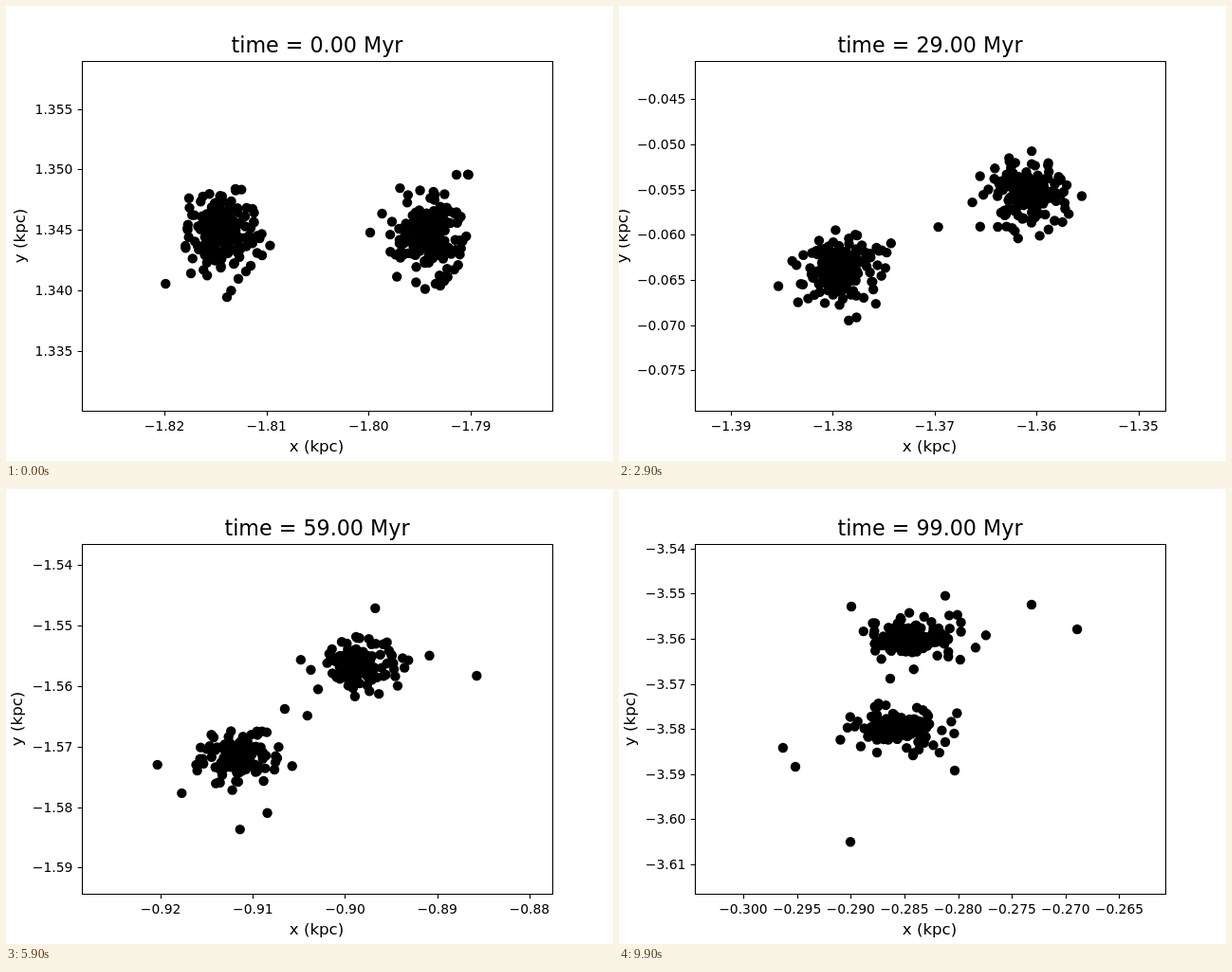
An HTML page for the animation above (10000 ms loop, 640 by 480 pixels).

```html
<!DOCTYPE html>
<html lang="en">
<head>
<meta charset="utf-8">
<title>Binary cluster</title>
<style>
  html, body { margin: 0; width: 100%; height: 100%; overflow: hidden; background: #fff; }
  svg { display: block; width: 640px; height: 480px; font-family: "DejaVu Sans", sans-serif; }
  text { text-anchor: middle; font-size: 13.89px; }
  .label { font-size: 16.67px; }
  #title { font-size: 22.22px; }
  #yTicks text { text-anchor: end; }
  path { fill: none; stroke: #000; stroke-width: 1.11; }
</style>
</head>
<body>
<svg viewBox="0 0 640 480">
  <g id="dots"></g>
  <path d="M80.5 58.5H576.5V427.5H80.5Z"/>
  <path id="marks"/>
  <g id="xTicks"></g>
  <g id="yTicks"></g>
  <text id="title" x="328" y="49"></text>
  <text class="label" x="327.5" y="470">x (kpc)</text>
  <text class="label" id="yLabel">y (kpc)</text>
</svg>
<script>
// Lengths are in parsecs, times in steps of 1 Myr
const PLOT = { x: 328, y: 242.4, width: 496, height: 369.6 };
const FRAME_MS = 100, FRAMES = 100, LAST = FRAMES - 2;
const CORE = 1.9, EDGE = 4.2, DOT = 5.2;
const $ = id => document.getElementById(id);

// View key points: step, offset from the pair's centre, visible width and height
const VIEW = [
  [0, -0.81, -0.17, 46.06, 28.94],
  [8, 0.18, -1.13, 45.82, 31.09],
  [28, -0.26, -0.61, 46.19, 38.77],
  [41, 0.98, 0.11, 50.32, 46.71],
  [58, 2.09, -1.38, 51.04, 57.93],
  [84, 2.01, -6.2, 48.75, 70.4],
  [98, 2.44, -7.72, 43.78, 77.65]
];

function viewAt(n) {
  const i = Math.max(1, VIEW.findIndex(key => key[0] >= n));
  const a = VIEW[i - 1], b = VIEW[i], u = (n - a[0]) / (b[0] - a[0]);
  const [, dx, dy, width, height] = a.map((v, k) => v + (b[k] - v) * u);
  const mx = -1804.24 + 15.502 * n, my = 1344.69 - 50.15 * n;
  const cx = mx + dx, cy = my + dy;
  const sx = PLOT.width / width, sy = PLOT.height / height;
  return {
    mx, my, cx, cy, width, height, sx, sy,
    toX: x => PLOT.x + (x - cx) * sx,
    toY: y => PLOT.y - (y - cy) * sy
  };
}

let seed = 20417;
function rand() {
  seed = (seed + 0x6D2B79F5) | 0;
  let t = Math.imul(seed ^ (seed >>> 15), 1 | seed);
  t = (t + Math.imul(t ^ (t >>> 7), 61 | t)) ^ t;
  return ((t ^ (t >>> 14)) >>> 0) / 4294967296;
}

// Random direction on a sphere, seen from the front
function direction() {
  const z = 2 * rand() - 1, a = 2 * Math.PI * rand(), s = Math.sqrt(1 - z * z);
  return [s * Math.cos(a), s * Math.sin(a)];
}

// Bound star on an ellipse inside a Plummer sphere
function boundStar() {
  let r;
  do r = CORE / Math.sqrt(Math.pow(rand(), -2 / 3) - 1); while (!(r < EDGE));
  const p = direction(), q = direction();
  const rate = 0.4 / Math.pow(1 + (r / CORE) ** 2, 0.75);
  return n => {
    const c = r * Math.cos(rate * n), s = r * Math.sin(rate * n);
    return [p[0] * c + q[0] * s, p[1] * c + q[1] * s];
  };
}

// Loose star drifting slowly outwards
function haloStar() {
  const r = 2.2 + 2.6 * rand(), drift = 0.03 * rand(), a = 2 * Math.PI * rand();
  return n => {
    const d = r + drift * n, angle = a + 0.02 * n;
    return [d * Math.cos(angle), d * Math.sin(angle)];
  };
}

// Both clusters circle a centre that moves in a straight line
function inCluster(side, orbit) {
  return (n, view) => {
    const [x, y] = orbit(n), turn = 0.0153 * n;
    return [
      view.toX(view.mx + side * 10 * Math.cos(turn) + x),
      view.toY(view.my + side * 10 * Math.sin(turn) + y)
    ];
  };
}

// Parabola through a start, middle and end value
function arc(a, b, c) {
  return n => {
    const u = n / LAST;
    return a * (1 - u) * (1 - 2 * u) + 4 * b * u * (1 - u) + c * u * (2 * u - 1);
  };
}

// The outermost stars keep a fixed margin to the view's sides
const edgeX = (side, y) => (n, v) =>
  [v.toX(v.cx + side * (v.width / 2 - 8.2)), y(n)];
const edgeY = (side, x) => (n, v) =>
  [x(n), v.toY(v.cy + side * (v.height / 2 - 9.4 - 0.022 * n))];
const escaper = (x, y) => n => [x(n), y(n)];

const stars = [
  edgeX(-1, arc(293, 293, 273)),
  edgeX(1, arc(178, 201, 148)),
  edgeY(1, arc(487, 402, 344)),
  edgeY(-1, arc(233, 246, 244)),
  escaper(arc(475, 450, 435), arc(178, 182, 122)),
  escaper(arc(195, 186, 186), arc(282, 321, 293)),
  escaper(arc(253, 265, 354), arc(280, 342, 297)),
  escaper(arc(384, 320, 344), arc(239, 236, 267)),
  escaper(arc(462, 330, 245), arc(290, 195, 124)),
  escaper(arc(270, 293, 286), arc(263, 238, 200))
];
for (const side of [-1, 1]) {
  for (let i = 0; i < 170; i++) stars.push(inCluster(side, boundStar()));
  for (let i = 0; i < 22; i++) stars.push(inCluster(side, haloStar()));
}

function add(parent, tag, attrs) {
  const el = document.createElementNS("http://www.w3.org/2000/svg", tag);
  for (const k in attrs) el.setAttribute(k, attrs[k]);
  return parent.appendChild(el);
}

const dots = stars.map(() => add($("dots"), "circle", { r: DOT }));

function ticks(centre, range) {
  const step = range > 45 ? 10 : 5, digits = step === 10 ? 2 : 3;
  const list = [], last = centre + range / 2;
  for (let v = Math.ceil((centre - range / 2) / step) * step; v <= last; v += step) {
    list.push({ value: v, text: (v / 1000).toFixed(digits).replace("-", "\u2212") });
  }
  return list;
}

function drawAxes(view) {
  let marks = "", widest = 0;
  $("xTicks").textContent = $("yTicks").textContent = "";
  for (const t of ticks(view.cx, view.width)) {
    const x = view.toX(t.value);
    marks += `M${Math.round(x) + 0.5} 427.5v4.86`;
    add($("xTicks"), "text", { x, y: 448 }).textContent = t.text;
  }
  for (const t of ticks(view.cy, view.height)) {
    const y = Math.round(view.toY(t.value));
    marks += `M80.5 ${y + 0.5}h-4.86`;
    const label = add($("yTicks"), "text", { x: 70.3, y: y + 5 });
    label.textContent = t.text;
    widest = Math.max(widest, label.getComputedTextLength());
  }
  $("marks").setAttribute("d", marks);
  $("yLabel").setAttribute("transform", `translate(${60 - widest} ${PLOT.y}) rotate(-90)`);
}

function draw(frame) {
  // The first two frames show the same state
  const n = Math.max(frame - 1, 0), view = viewAt(n);
  stars.forEach((star, i) => {
    const [x, y] = star(n, view);
    dots[i].setAttribute("cx", x.toFixed(2));
    dots[i].setAttribute("cy", y.toFixed(2));
  });
  drawAxes(view);
  $("title").textContent = `time = ${frame.toFixed(2)} Myr`;
}

let shown = -1;
const start = performance.now();
function tick() {
  const frame = Math.floor(Math.max(performance.now() - start, 0) / FRAME_MS) % FRAMES;
  if (frame !== shown) draw(shown = frame);
  requestAnimationFrame(tick);
}
tick();
</script>
</body>
</html>
```
